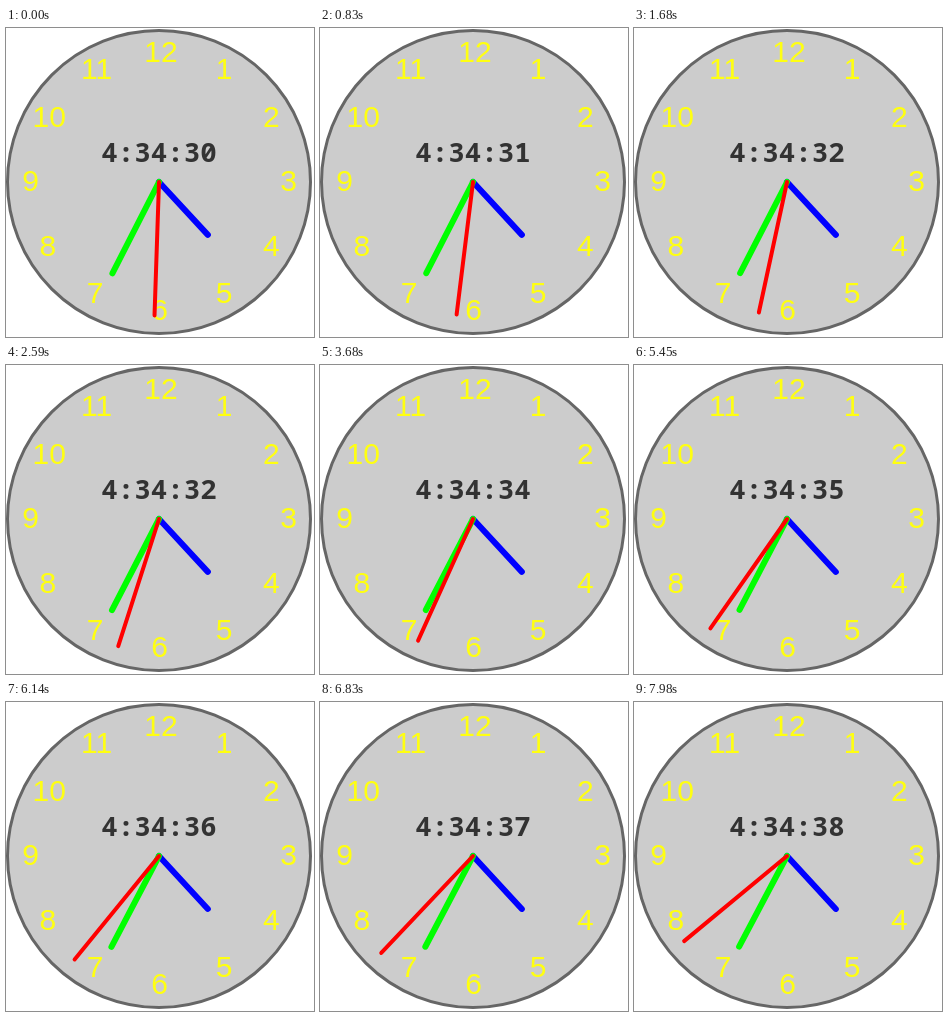
Animation, 308 px wide and 309 px high, one loop 8 s. Source, as an HTML page with a canvas:

```html
<!DOCTYPE html>
<html lang="en">
<head>
<meta charset="utf-8">
<title>Clock</title>
<style>
  html, body { margin: 0; width: 100%; height: 100%; overflow: hidden; background: #fff; }
  canvas { display: block; }
</style>
</head>
<body>
<canvas id="clock" width="308" height="309"></canvas>
<script>
const ctx = document.getElementById('clock').getContext('2d');
const LOOP = 8000;
const TICK = 76.9;             // ms between hand steps
const CX = 153, CY = 154;
const HOUR = 4, MINUTE = 34;
const START_SECOND = 30.32;
const SECONDS_PER_TICK = 0.0777;

// Point at a clockwise angle, in turns from twelve o'clock.
function polar(turn, radius) {
  const a = turn * 2 * Math.PI;
  return [CX + radius * Math.sin(a), CY - radius * Math.cos(a)];
}

function drawFace() {
  ctx.fillStyle = '#fff';
  ctx.fillRect(0, 0, 308, 309);
  ctx.beginPath();
  ctx.arc(CX, CY, 151.5, 0, 2 * Math.PI);
  ctx.fillStyle = '#ccc';
  ctx.fill();
  ctx.strokeStyle = '#666';
  ctx.lineWidth = 3;
  ctx.stroke();

  ctx.fillStyle = '#ff1';
  ctx.font = '30px "Liberation Sans", Arial, sans-serif';
  for (let n = 1; n <= 12; n++) {
    const [x, y] = polar(n / 12, 129);
    ctx.fillText(n, x + (n > 9 ? 2 : 0.5), y + 9.2);
  }
}

function drawHand(turn, length, width, color) {
  ctx.beginPath();
  ctx.moveTo(CX, CY);
  ctx.lineTo(...polar(turn, length));
  ctx.strokeStyle = color;
  ctx.lineWidth = width;
  ctx.stroke();
}

function draw(time) {
  const ticks = Math.max(0, Math.floor((time - 45) / TICK) + 1);
  const second = START_SECOND + ticks * SECONDS_PER_TICK;
  const minute = MINUTE + second / 60;
  const hour = HOUR + minute / 60;

  drawFace();
  ctx.fillStyle = '#333';
  ctx.font = '600 27.5px "Noto Sans Mono", monospace';
  ctx.fillText(`${HOUR}:${MINUTE}:${Math.floor(second)}`, CX, 134);

  drawHand(hour / 12, 72, 6, '#00f');
  drawHand(minute / 60, 102.5, 6, '#0f0');
  drawHand(second / 60, 133.5, 4, '#f00');
}

ctx.textAlign = 'center';
ctx.lineCap = 'round';
const start = performance.now();
function frame() {
  draw((performance.now() - start) % LOOP);
  requestAnimationFrame(frame);
}
frame();
</script>
</body>
</html>
```
